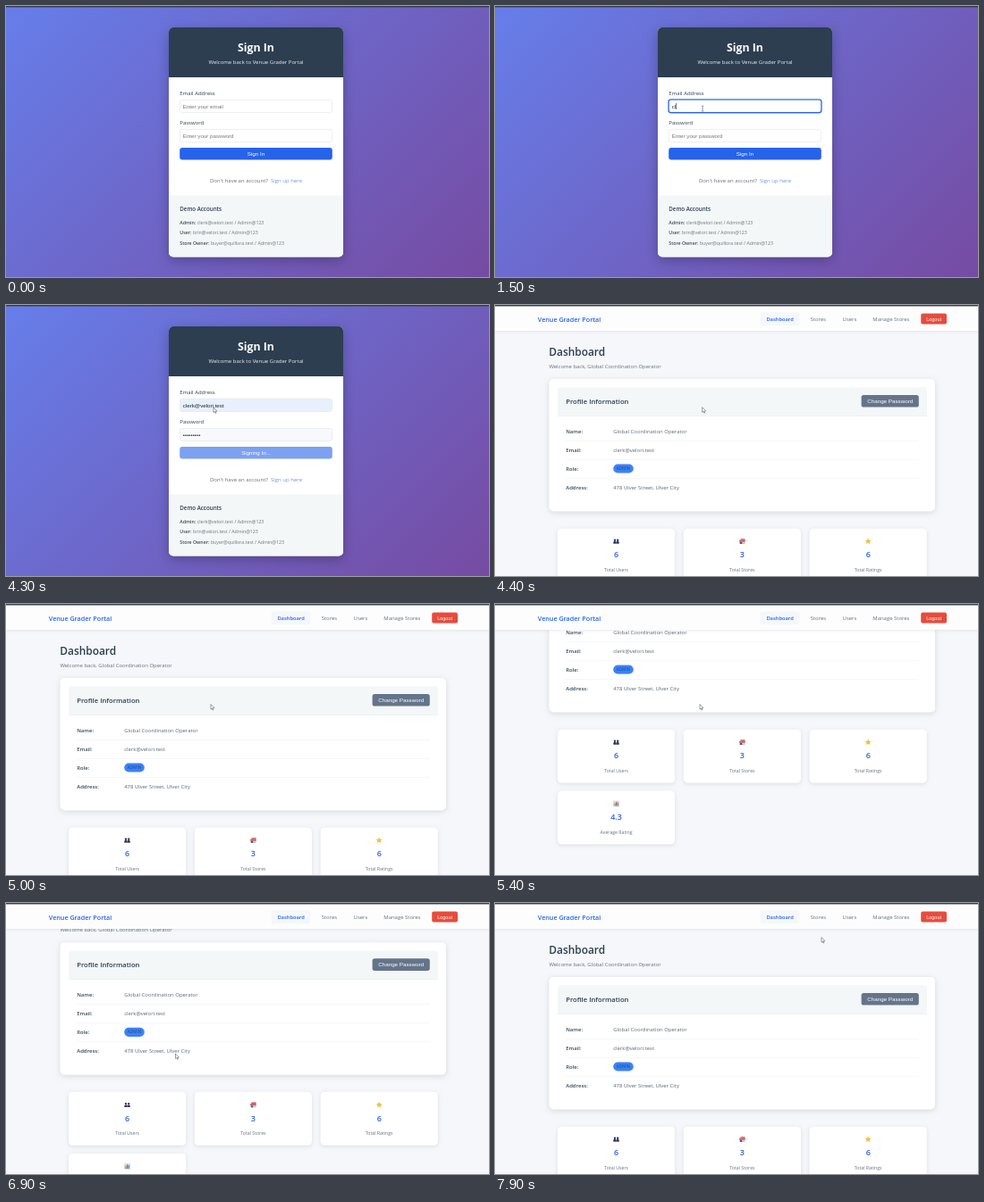
Write an HTML page with a canvas that moves like this. It is 540 by 304 pixels and loops after 8 s.

```html
<!DOCTYPE html>
<html lang="en">
<head>
<meta charset="utf-8">
<title>Sign in and dashboard</title>
<style>
html, body { margin: 0; width: 100%; height: 100%; overflow: hidden; background: #f5f7fa; }
canvas { display: block; width: 540px; height: 304px; }
</style>
</head>
<body>
<canvas id="stage"></canvas>
<script>
const W = 540, H = 304, LOOP = 8000, STEP = 100;
const UI = '"Open Sans", "Noto Sans", sans-serif';
const FORM = '"Liberation Sans", Arial, sans-serif';
const NAVY = '#2c3e50', BLUE = '#2563eb', GREY = '#64707d', PALE = '#f4f7f8';

const APP = 'Venue Grader Portal';
const EMAIL = 'clerk@velori.test';
const USER = 'Global Coordination Operator';
const ADDRESS = '478 Ulver Street, Ulver City';

const canvas = document.getElementById('stage');
const ctx = canvas.getContext('2d');
const dpr = window.devicePixelRatio || 1;
canvas.width = W * dpr;
canvas.height = H * dpr;

function box(x, y, w, h, r, fill, stroke, line = 0.7) {
  ctx.beginPath();
  ctx.roundRect(x, y, w, h, r);
  if (fill) { ctx.fillStyle = fill; ctx.fill(); }
  if (stroke) { ctx.strokeStyle = stroke; ctx.lineWidth = line; ctx.stroke(); }
}

function shadowBox(x, y, w, h, r, fill, dy, blur, alpha) {
  ctx.save();
  ctx.shadowColor = `rgba(0,0,0,${alpha})`;
  ctx.shadowBlur = blur * dpr;
  ctx.shadowOffsetY = dy * dpr;
  box(x, y, w, h, r, fill);
  ctx.restore();
}

// Draws text and returns its width.
function text(str, x, y, size, color, { weight = 400, font = UI, align = 'left' } = {}) {
  ctx.font = `${weight} ${size}px ${font}`;
  ctx.textAlign = align;
  ctx.fillStyle = color;
  ctx.fillText(str, x, y);
  return ctx.measureText(str).width;
}

function shape(fill, points) {
  ctx.beginPath();
  points.forEach(([x, y]) => ctx.lineTo(x, y));
  ctx.closePath();
  ctx.fillStyle = fill;
  ctx.fill();
}

function dot(x, y, r, fill) {
  ctx.beginPath();
  ctx.arc(x, y, r, 0, Math.PI * 2);
  ctx.fillStyle = fill;
  ctx.fill();
}

const clamp = v => Math.max(0, Math.min(1, v));
const ease = v => v * v * (3 - 2 * v);
const progress = (t, a, b) => ease(clamp((t - a) / (b - a)));

// Pointer keys: time, x, y
const path = [
  [300, 500, 176], [900, 233, 123], [1100, 232, 115], [4300, 232, 115],
  [4800, 229, 112.5], [5500, 229, 112.5], [6200, 189.5, 169],
  [7200, 189.5, 169], [7800, 365, 38.5], [8000, 365, 38.5]
];

function pointerAt(t) {
  for (let i = 1; i < path.length; i++) {
    const [t0, x0, y0] = path[i - 1], [t1, x1, y1] = path[i];
    if (t <= t1) {
      const p = progress(t, t0, t1);
      return [x0 + (x1 - x0) * p, y0 + (y1 - y0) * p];
    }
  }
}

function arrow(x, y) {
  ctx.save();
  ctx.translate(x, y);
  ctx.lineJoin = 'round';
  shape('#fff', [[0, 0], [0, 5.6], [1.3, 4.5], [2.2, 6.5], [3, 6.1], [2.2, 4.2], [3.9, 4.1]]);
  ctx.strokeStyle = '#3b4148';
  ctx.lineWidth = 0.5;
  ctx.stroke();
  ctx.restore();
}

function beam(x, y) {
  ctx.fillStyle = '#555';
  ctx.fillRect(x - 0.25, y - 3, 0.6, 6);
  for (const dy of [-3.2, 2.8]) ctx.fillRect(x - 1.2, y + dy, 2.5, 0.5);
}

function caret(x, y, t, since) {
  if ((t - since) % 1000 < 500) {
    ctx.fillStyle = '#111';
    ctx.fillRect(x + 0.2, y - 5.5, 0.6, 7);
  }
}

function field(y, value, hint, { focus, fill = '#fff', color = '#1f2328' }) {
  if (focus) {
    box(193.9, y - 0.1, 171.2, 15, 2.8, fill, '#cfdcfa', 2);
    box(194.1, y + 0.1, 170.8, 14.6, 2.6, null, BLUE, 1.1);
  } else {
    box(194.4, y + 0.4, 170.2, 14.2, 2.5, fill, '#e2e8ee');
  }
  const w = text(value || hint, 197.8, y + 9.6, 6.2, value ? color : '#757575', { font: FORM });
  return 197.8 + (value ? w : 0);
}

function login(t) {
  const g = ctx.createLinearGradient(59, -58.5, 481, 362.5);
  g.addColorStop(0, '#667eea');
  g.addColorStop(1, '#764ba2');
  ctx.fillStyle = g;
  ctx.fillRect(0, 0, W, H);
  ctx.fillStyle = '#343a4c';
  ctx.fillRect(0, 0, W, 1.4);

  shadowBox(182, 24, 195, 257.5, 5, '#fff', 4, 14, 0.25);
  box(182, 24, 195, 56, [5, 5, 0, 0], NAVY);
  box(182, 212.5, 195, 69, [0, 0, 5, 5], PALE);

  const mid = { align: 'center' };
  text('Sign In', 279.5, 51, 12.3, '#fff', { weight: 700, align: 'center' });
  text('Welcome back to ' + APP, 279.5, 65.3, 6, '#eef1f4', mid);

  // Form state
  const onEmail = t >= 1100 && t < 2500;
  const onPass = t >= 2500 && t < 3800;
  const filled = t >= 2100;
  const busy = t >= 3800;
  const typed = filled ? EMAIL : EMAIL.slice(0, clamp((t - 1200) / 200) * 2);
  const dots = '•'.repeat(Math.max(0, Math.min(9, Math.floor((t - 2800) / 100))));

  text('Email Address', 194.3, 99.7, 6, NAVY, { weight: 500 });
  const ex = field(104.9, typed, 'Enter your email', { focus: onEmail, fill: filled ? '#e8f0fe' : '#fff' });
  if (onEmail) caret(ex, 114.5, t, 1400);
  text('Password', 194.3, 132.7, 6, NAVY, { weight: 500 });
  const px = field(138, dots, 'Enter your password', { focus: onPass, fill: busy ? '#f8f9fa' : '#fff' });
  if (onPass) caret(px, 147.6, t, 2500);

  box(194.2, 159, 170.6, 13.5, 3, busy ? '#7ca1f3' : BLUE);
  text(busy ? 'Signing In...' : 'Sign In', 279.5, 167.9, 6.2, '#fff', { font: FORM, weight: 500, align: 'center' });

  text('Don\'t have an account?', 228, 198.4, 6, '#666c73');
  text('Sign up here', 296, 198.4, 6, '#6b95dc');

  text('Demo Accounts', 194.3, 229.8, 6.2, NAVY, { weight: 600 });
  [['Admin:', EMAIL], ['User:', 'brin@velori.test'], ['Store Owner:', 'buyer@quillora.test']].forEach(([who, mail], i) => {
    const y = 244.9 + i * 11.3;
    const w = text(who, 194.3, y, 5.24, '#3f4a55', { weight: 600 });
    text(mail + ' / Admin@123', 194.3 + w + 1.5, y, 5.24, '#6d747b');
  });

  if (t >= 300) {
    const [x, y] = pointerAt(t);
    const overField = x > 194 && x < 365 && ((y > 105 && y < 120) || (y > 138 && y < 153));
    (overField && !busy ? beam : arrow)(x, y);
  }
}

const icons = {
  people(x, y) {
    for (const dx of [-1.6, 1.6]) {
      dot(x + dx, y - 1.4, 1.2, '#30345a');
      box(x + dx - 1.6, y - 0.1, 3.1, 2.7, [1.2, 1.2, 0, 0], '#30345a');
    }
  },
  shop(x, y) {
    box(x - 3, y - 1.5, 6, 4.2, 0.3, '#8fb4c4');
    box(x - 2, y - 2.9, 5.2, 1.5, 0.3, '#d9534f');
    box(x - 3.4, y - 1.3, 6.8, 1.7, 0.4, '#e05261');
    box(x - 2.3, y + 0.9, 1.8, 1.8, 0, '#5a4a55');
    box(x + 0.3, y + 0.9, 2.1, 1.2, 0, '#d5eef3');
  },
  star(x, y) {
    shape('#f0c244', Array.from({ length: 10 }, (_, i) => {
      const a = -Math.PI / 2 + i * Math.PI / 5, r = i % 2 ? 1.8 : 3.6;
      return [x + r * Math.cos(a), y + r * Math.sin(a)];
    }));
  },
  chart(x, y) {
    box(x - 3.1, y - 3, 6.2, 6, 0.4, '#dce6ee', '#a9b9c6', 0.4);
    box(x - 2.2, y - 0.6, 1.2, 3.1, 0, '#4caf6a');
    box(x - 0.6, y - 2.2, 1.2, 4.7, 0, '#d9534f');
    box(x + 1, y - 1.4, 1.2, 3.9, 0, '#3b82d6');
  }
};

function stat(x, y, icon, value, label) {
  const cx = x + 65.6;
  shadowBox(x, y, 131.2, 60, 4.5, '#fff', 1.2, 4.5, 0.1);
  icons[icon](cx, y + 14.5);
  text(value, cx, y + 32.6, 9, '#2f62e0', { weight: 600, align: 'center' });
  text(label, cx, y + 48.1, 5.2, GREY, { weight: 500, align: 'center' });
}

function nav() {
  shadowBox(0, 0, W, 29, 0, '#fdfdfe', 0.8, 3, 0.1);
  ctx.fillStyle = '#343f50';
  ctx.fillRect(0, 0, W, 1.4);
  text(APP, 47.8, 18.8, 7.2, BLUE, { weight: 600 });
  box(296.8, 8.3, 43.6, 15, 2, '#f5f7fa');
  text('Dashboard', 303.4, 18, 5.75, BLUE, { weight: 600 });
  text('Stores', 352.8, 18, 5.9, GREY);
  text('Users', 388.6, 18, 5.9, GREY);
  text('Manage Stores', 422.3, 18, 5.95, GREY);
  box(476.2, 9.6, 28.8, 12, 2, '#e74c3c');
  text('Logout', 490.6, 17.6, 5.5, '#fff', { font: FORM, align: 'center' });
}

function dashboard(t) {
  ctx.fillStyle = '#f5f7fa';
  ctx.fillRect(0, 0, W, H);
  const scroll = 110 * (progress(t, 5050, 5400) - progress(t, 6600, 7100));

  ctx.save();
  ctx.translate(0, -scroll);
  text('Dashboard', 60.3, 56.6, 11.9, NAVY, { weight: 600 });
  text('Welcome back, ' + USER, 60.4, 71.1, 5.95, GREY);

  shadowBox(60.5, 83, 431.5, 148.5, 5, '#fff', 1.5, 6, 0.12);
  box(70, 92.3, 413, 32.4, [3, 3, 0, 0], PALE);
  box(70, 124.2, 413, 0.6, 0, '#e6ebef');
  text('Profile Information', 79.2, 110.7, 7.65, NAVY, { weight: 600 });
  box(409.6, 101, 64.2, 13.6, 2.6, '#64748b');
  text('Change Password', 441.7, 110, 6.24, '#fff', { font: FORM, align: 'center' });

  ['Name:', 'Email:', 'Role:', 'Address:'].forEach((label, i) => {
    const y = 144 + i * 21;
    text(label, 79.2, y, 5.95, '#3a4a5a', { weight: 600 });
    if (i < 3) box(79.2, y + 8.2, 394.6, 0.5, 0, '#edf0f3');
    const value = [USER, EMAIL, '', ADDRESS][i];
    if (value) text(value, 132.2, y, 5.95, '#5b6672');
  });
  box(132.2, 178.4, 22.6, 10.2, 5.1, '#3b82f6');
  ctx.letterSpacing = '0.2px';
  text('ADMIN', 143.6, 185.2, 4.4, '#1f4489', { align: 'center' });
  ctx.letterSpacing = '0px';

  stat(70, 250.7, 'people', '6', 'Total Users');
  stat(210.8, 250.7, 'shop', '3', 'Total Stores');
  stat(351.6, 250.7, 'star', '6', 'Total Ratings');
  stat(70, 319.6, 'chart', '4.3', 'Average Rating');
  ctx.restore();

  nav();
  arrow(...pointerAt(t));
}

const start = performance.now();
function frame(now) {
  const t = Math.floor(Math.max(0, now - start) % LOOP / STEP) * STEP;
  ctx.setTransform(dpr, 0, 0, dpr, 0, 0);
  ctx.textBaseline = 'alphabetic';
  (t < 4400 ? login : dashboard)(t);
  requestAnimationFrame(frame);
}
requestAnimationFrame(frame);
</script>
</body>
</html>
```
